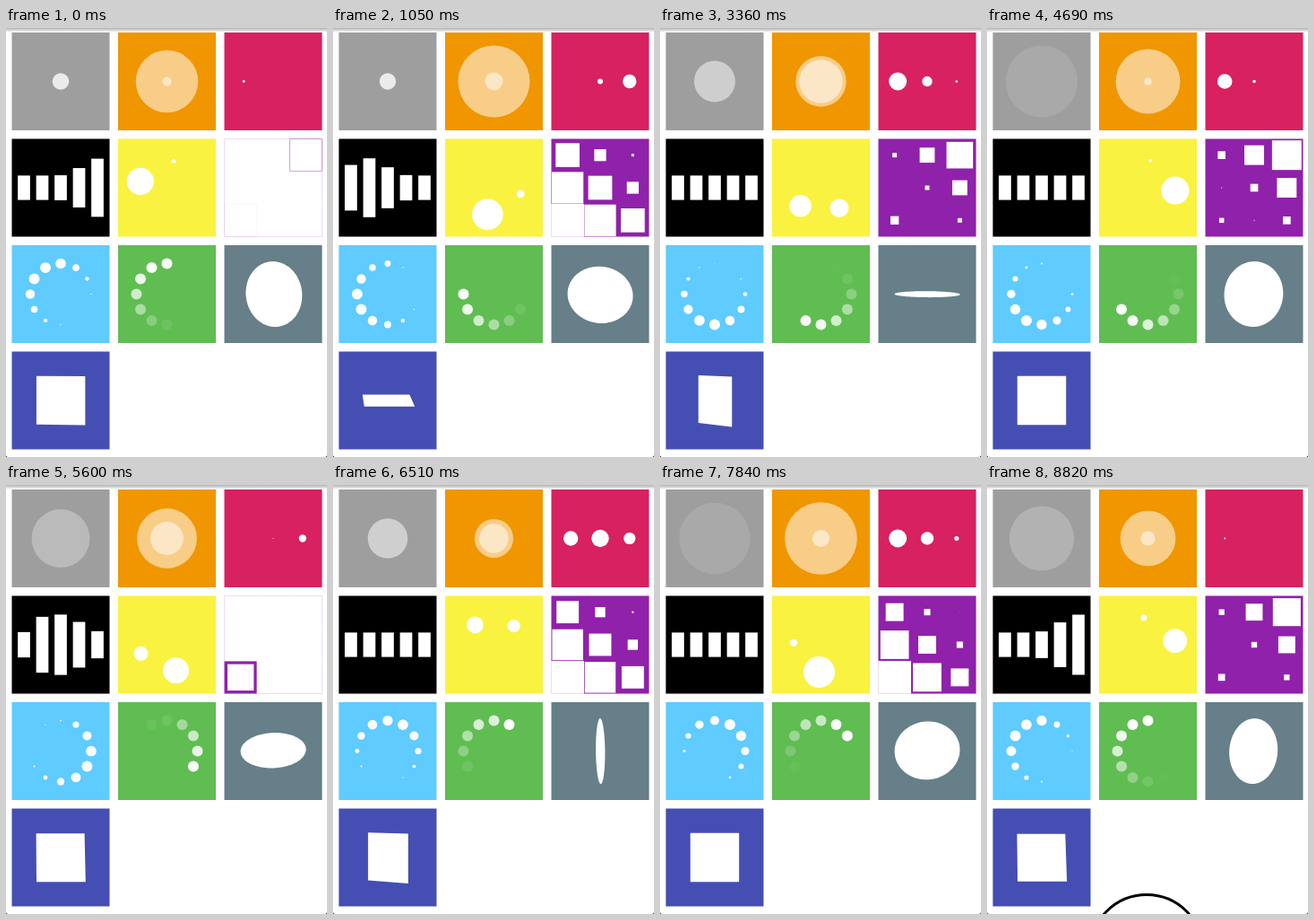
Write an HTML page with a canvas that moves like this. It is 358x478 px and loops after 8890 ms.

```html
<!DOCTYPE html>
<html lang="en">
<head>
<meta charset="utf-8">
<title>Loading spinners</title>
<style>
  html, body { margin: 0; width: 100%; height: 100%; overflow: hidden; background: #fff; }
  canvas { display: block; width: 358px; height: 478px; }
</style>
</head>
<body>
<canvas id="stage"></canvas>
<script>
const W = 358, H = 478;
const LOOP = 8890, STEP = 70;
const SLOWDOWN = 1.053;   // playback runs slightly slower than the spinners' own clock
const LEAD = 75;          // the first part of each spinner starts a little early
const TILE = 109, PITCH = 118.5, LEFT = 6.5, TOP = 5;
const MID = TILE / 2;
const DEPTH = 750;        // camera distance

const canvas = document.getElementById('stage');
const ctx = canvas.getContext('2d');
const ratio = window.devicePixelRatio || 1;
canvas.width = W * ratio;
canvas.height = H * ratio;

const wrap = (v, n) => ((v % n) + n) % n;
const lead = i => (i === 0 ? LEAD : 0);

// cubic-bezier(.42, 0, .58, 1)
function ease(u) {
  let lo = 0, hi = 1;
  for (let n = 0; n < 22; n++) {
    const p = (lo + hi) / 2, q = 1 - p;
    if (1.26 * q * q * p + 1.74 * q * p * p + p * p * p < u) lo = p; else hi = p;
  }
  return lo * lo * (3 - 2 * lo);
}

// Value at a time within a cycle, eased between neighbouring stops
function track(time, period, stops, values) {
  const x = wrap(time, period) / period;
  let i = 0;
  while (i < stops.length - 2 && x >= stops[i + 1]) i++;
  const u = (x - stops[i]) / (stops[i + 1] - stops[i]);
  return values[i] + (values[i + 1] - values[i]) * ease(u);
}

const swell = (time, period) => track(time, period, [0, .5, 1], [0, 1, 0]);

function dot(x, y, r, alpha = 1) {
  ctx.globalAlpha = alpha;
  ctx.beginPath();
  ctx.arc(x, y, Math.max(r, 0), 0, Math.PI * 2);
  ctx.fill();
  ctx.globalAlpha = 1;
}

function box(x, y, w, h) {
  ctx.fillRect(x - w / 2, y - h / 2, w, h);
}

function pulse(t) {
  const s = track(t + 315, 1000, [0, 1], [0, 1]);
  dot(MID, MID, 45 * s, 1 - s);
}

function doubleBounce(t) {
  for (const start of [1330, 235]) dot(MID, MID, 45 * swell(t + start, 2000), .53);
}

function threeBounce(t) {
  for (let i = 0; i < 3; i++) {
    const s = track(t + 70 - 160 * i + lead(i), 1400, [0, .4, .8, 1], [0, 1, 0, 0]);
    dot(MID + 32.8 * (i - 1), MID, 10 * s);
  }
}

function wave(t) {
  for (let i = 0; i < 5; i++) {
    const s = track(t + 735 - 100 * i + lead(i), 1400, [0, .2, .4, 1], [.4, 1, .4, .4]);
    box(MID + 20.5 * (i - 2), MID, 13.7, 68 * s);
  }
}

function chasingDots(t) {
  [[1330, 193.5], [235, 284]].forEach(([start, degrees]) => {
    const a = (degrees + t * .18) * Math.PI / 180;
    dot(MID + 30.5 * Math.cos(a), MID + 30.5 * Math.sin(a), 19.5 * swell(t + start, 2000));
  });
}

function cubeGrid(t) {
  const cell = TILE / 3;
  for (let row = 0; row < 3; row++) {
    for (let col = 0; col < 3; col++) {
      const order = col + 2 - row;
      const s = track(t - 52 - 100 * order + lead(order), 1300, [0, .35, .7, 1], [1, 0, 1, 1]);
      const size = (cell + .4) * s;
      box(cell * (col + .5), cell * (row + .5), size, size);
    }
  }
}

function ring(draw) {
  for (let i = 0; i < 12; i++) {
    const a = (i - 3) * Math.PI / 6;
    draw(MID + 34 * Math.cos(a), MID + 34 * Math.sin(a), 450 - 100 * i + lead(i));
  }
}

function circle(t) {
  ring((x, y, start) => dot(x, y, 6 * swell(t + start, 1200)));
}

function fadingCircle(t) {
  ring((x, y, start) =>
    dot(x, y, 6, track(t + start, 1200, [0, .39, .4, 1], [0, 0, 1, 0])));
}

// Turns points about the tile centre; the camera looks from the tile's corner
function flip(points, time, period) {
  const stops = [0, .5, 1];
  const ax = track(time, period, stops, [0, Math.PI, Math.PI]);
  const ay = track(time, period, stops, [0, 0, Math.PI]);
  ctx.beginPath();
  for (const [px, py] of points) {
    const y = py * Math.cos(ax), z = py * Math.sin(ax);
    const x = px * Math.cos(ay) - z * Math.sin(ay);
    const k = DEPTH / (DEPTH - px * Math.sin(ay) - z * Math.cos(ay));
    ctx.lineTo((MID + x) * k, (MID + y) * k);
  }
  ctx.fill();
}

const half = 27.2;
const square = [[-half, -half], [half, -half], [half, half], [-half, half]];
const disc = Array.from({ length: 96 }, (_, i) => {
  const a = i * Math.PI / 48;
  return [36.4 * Math.cos(a), 36.4 * Math.sin(a)];
});

const rotatingCircle = t => flip(disc, t + 1305, 2000);
const rotatingPlane = t => flip(square, t + 870, 1513);

const tiles = [
  ['#9e9e9e', pulse], ['#f09600', doubleBounce], ['#d72161', threeBounce],
  ['#000000', wave], ['#faf240', chasingDots], ['#9021aa', cubeGrid],
  ['#5fcbff', circle], ['#60bd52', fadingCircle], ['#667f89', rotatingCircle],
  ['#454eb2', rotatingPlane]
];

function screenEdges() {
  const shade = ctx.createLinearGradient(0, 0, 0, 5);
  shade.addColorStop(0, 'rgba(0,0,0,.3)');
  shade.addColorStop(1, 'rgba(0,0,0,0)');
  ctx.fillStyle = shade;
  ctx.fillRect(0, 0, W, 5);
  ctx.fillStyle = '#000';
  for (const [x, dir] of [[0, 1], [W, -1]]) {
    ctx.beginPath();
    ctx.moveTo(x, H - 2);
    ctx.quadraticCurveTo(x, H, x + 2 * dir, H);
    ctx.lineTo(x, H);
    ctx.fill();
  }
}

function risingButton(time) {
  const rise = (time - 8680) / 140;
  if (rise <= 0) return;
  ctx.fillStyle = '#fff';
  ctx.strokeStyle = '#000';
  ctx.lineWidth = 3;
  ctx.beginPath();
  ctx.arc(178, H + 64.5 - 23 * rise, 63, 0, Math.PI * 2);
  ctx.fill();
  ctx.stroke();
}

function render(time) {
  const t = time / SLOWDOWN;
  ctx.setTransform(ratio, 0, 0, ratio, 0, 0);
  ctx.fillStyle = '#fff';
  ctx.fillRect(0, 0, W, H);
  tiles.forEach(([color, draw], i) => {
    ctx.save();
    ctx.translate(LEFT + PITCH * (i % 3), TOP + PITCH * Math.floor(i / 3));
    ctx.fillStyle = color;
    ctx.fillRect(0, 0, TILE, TILE);
    ctx.fillStyle = '#fff';
    draw(t);
    ctx.restore();
  });
  screenEdges();
  risingButton(time);
}

const began = performance.now();
function tick() {
  const time = (performance.now() - began) % LOOP;
  render(Math.floor(time / STEP) * STEP);
  requestAnimationFrame(tick);
}
tick();
</script>
</body>
</html>
```
